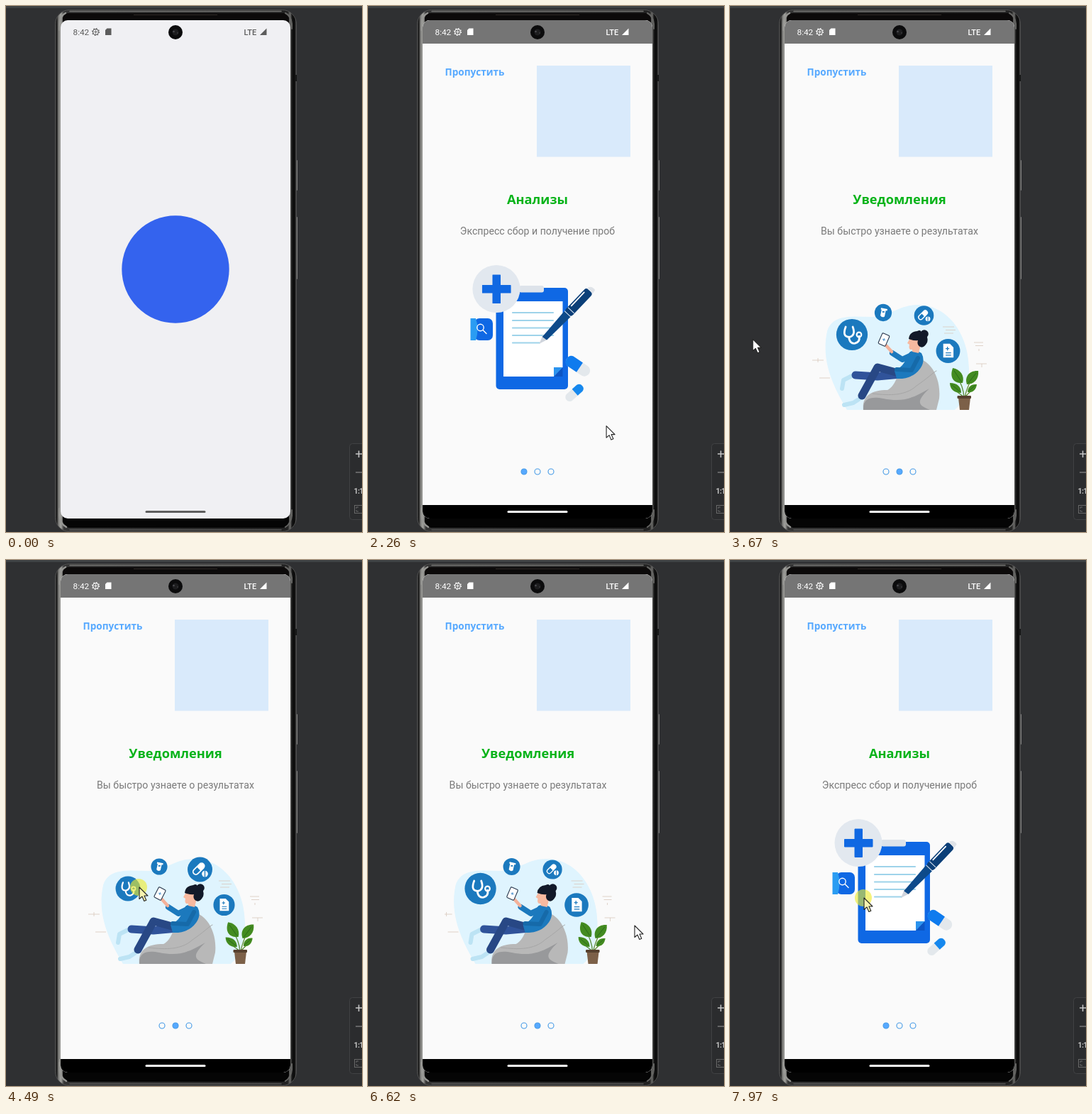
Animation, 502 px wide and 741 px high, one loop 8 s. Source, as an HTML page:

```html
<!DOCTYPE html>
<html lang="ru">
<head>
<meta charset="utf-8">
<title>Onboarding</title>
<style>
html, body { margin: 0; width: 100%; height: 100%; overflow: hidden; background: #2f3032; }
svg { display: block; width: 100%; height: 100%; }
text { font-family: Roboto, sans-serif; }
.title { font: 700 18.2px "Noto Sans", sans-serif; fill: #07b319; text-anchor: middle; }
.body { font-size: 14.15px; fill: #7a7a7a; text-anchor: middle; }
.skip { font: 600 13.6px "Noto Sans", sans-serif; fill: #57a9ff; }
.line { fill: none; stroke-linecap: round; stroke-linejoin: round; }
</style>
</head>
<body>
<svg viewBox="0 0 502 741" preserveAspectRatio="none">
<defs>
  <linearGradient id="edge">
    <stop offset="0" stop-color="#3c3c3c"/><stop offset=".006" stop-color="#1a1a1a"/>
    <stop offset=".014" stop-color="#82827f"/><stop offset=".024" stop-color="#a2a29e"/>
    <stop offset=".036" stop-color="#343434"/><stop offset=".964" stop-color="#222"/>
    <stop offset=".974" stop-color="#6c6c6a"/><stop offset=".982" stop-color="#161616"/>
    <stop offset=".992" stop-color="#080808"/><stop offset="1" stop-color="#4c4c4c"/>
  </linearGradient>
  <clipPath id="screenClip"><rect x="77" y="20" width="324" height="702" rx="10"/></clipPath>
  <clipPath id="pagerClip"><rect x="108" y="258" width="262" height="385"/></clipPath>
</defs>

<rect width="502" height="741" fill="#2f3032"/>
<rect width="502" height="3" fill="#3f4244"/>

<!-- phone body -->
<rect x="409" y="217" width="2" height="43" rx="1" fill="#858585"/>
<rect x="409" y="297" width="2" height="88" rx="1" fill="#858585"/>
<rect x="69.500" y="5.500" width="340" height="735" rx="20" fill="url(#edge)" stroke="#505050"/>
<path class="line" d="M90 7.500H388" stroke="#777775" stroke-width="1.600"/>
<path class="line" d="M90 738H388" stroke="#555" stroke-width="1.600"/>
<path d="M88 10H391Q398 10 399 17V30H80V17Q81 10 88 10Z" fill="#0c0a0a"/>
<path d="M80 710H399V726Q398 734 390 735H89Q81 734 80 726Z" fill="#050505"/>
<path class="line" d="M75.500 34V25Q76 14 84 10M75.500 708V718Q76 729 85 734" stroke="#969693" stroke-width="2.500"/>
<path class="line" d="M403 32V25Q402 14 394 10M403 710V718Q402 729 394 734" stroke="#646462" stroke-width="2"/>
<path d="M180 12.500H298" stroke="#302b28"/>
<path d="M409 97V106" stroke="#151515" stroke-width="2"/>

<g clip-path="url(#screenClip)">
  <rect x="77" y="20" width="324" height="702" fill="#f0f0f3"/>
  <circle id="splash" cx="239" cy="371" r="75.700" fill="#3463ee"/>

  <g id="app">
    <rect x="77" y="20" width="324" height="702" fill="#fafafa"/>
    <rect x="77" y="20" width="324" height="33" fill="#757575"/>
    <rect x="77" y="703" width="324" height="19"/>
    <text id="skip" class="skip" x="108.500" y="98"></text>
    <rect x="238" y="84" width="132" height="128.500" fill="#d9eafb"/>

    <g clip-path="url(#pagerClip)">
      <g id="page0">
        <text class="title" x="239" y="279">Анализы</text>
        <text class="body" x="239" y="322">Экспресс сбор и получение проб</text>
        <rect x="180.500" y="397" width="101.500" height="143" rx="5" fill="#0f68e4"/>
        <path d="M191 416H274.500V509L262 522H191Z" fill="#fff"/>
        <path d="M262 522V509H274.500Z" fill="#2b93ee"/>
        <path d="M262 522L274.500 509V522Z" fill="#0c55c4"/>
        <rect x="213" y="394" width="35" height="9.500" rx="3" fill="#dde3ea"/>
        <path class="line" d="M204 432H261M204 443H261M204 453.500H261M204 464H261M204 474.500H242" stroke="#9ed3ea" stroke-width="2.200"/>
        <g id="cross">
          <circle cx="181" cy="398.500" r="33.500" fill="#e2e8ef"/>
          <path d="M176 379h10.500v14.500h14.500v10.500h-14.500v14.500h-10.500v-14.500h-14.500v-10.500h14.500z" fill="#1068e2" stroke="#1068e2" stroke-linejoin="round"/>
        </g>
        <rect x="150" y="440" width="26" height="31" rx="7" fill="#0f68e4"/>
        <path d="M144.500 440H152Q157 455 152 471H144.500Z" fill="#2a9cf2"/>
        <g class="line" stroke="#fff" stroke-width="1.400"><circle cx="158.500" cy="453" r="4.700"/><path d="M162 456.500L167 461.500"/></g>
        <g id="pen">
          <g transform="translate(241 476) rotate(-46.500)">
            <path d="M0 0L13-5L14 5Z" fill="#cfd4dc"/>
            <path d="M10-3.700L58-6L58 6L11 4Z" fill="#0d4a8a"/>
            <rect x="58" y="-6.500" width="45" height="13" rx="4" fill="#0b3f78"/>
            <path d="M104-5Q111-3 109 5L103 6Z" fill="#dfe3e8"/>
            <path class="line" d="M70-4H96" stroke="#fff" stroke-width="1.800"/>
            <path d="M58-6V6M65-6V6" stroke="#dfe9f4" stroke-width="1"/>
          </g>
        </g>
        <g transform="translate(296 507.500) rotate(34)">
          <rect x="-19" y="-8" width="38" height="16" rx="8" fill="#e3e8ec"/>
          <path d="M3-8H-13Q-19-7-19 0T-13 8H3Z" fill="#0f7bee"/>
        </g>
        <g transform="translate(291 545) rotate(-42)">
          <rect x="-15" y="-6" width="30" height="12" rx="6" fill="#e3e8ec"/>
          <path d="M1-6H10Q15-5 15 0T10 6H1Z" fill="#1688ee"/>
        </g>
      </g>

      <g id="page1">
        <text class="title" x="239" y="279">Уведомления</text>
        <text class="body" x="239" y="322">Вы быстро узнаете о результатах</text>
        <path d="M165 569C145 535 128 500 137 458C145 433 174 438 202 438C230 435 238 421 266 421C310 422 337 466 337 512C337 540 327 561 317 569Z" fill="#dff4fe"/>
        <path d="M300 452H316M304 456.500H318M302 461H315M344 474H357M346 478.500H357M351 483V486M347 504H362M355 504V509M116 499H132M124 496V502M126 524H141" stroke="#d9c8bb" stroke-width=".8"/>
        <path d="M188 569C186 550 198 541 222 541C239 533 237 500 257 496C282 494 298 524 295 553L291 569Z" fill="#b8b8b8"/>
        <path d="M188 569C187 552 200 550 216 553C246 559 260 551 281 539C260 559 267 563 282 569Z" fill="#98999b"/>
        <path class="line" d="M201 546C226 549 248 549 263 535C278 525 288 515 291 514" stroke="#a6a6a6"/>
        <path class="line" d="M172 521L160 527L158 539M183 553L174 559L161 562" stroke="#bce3f4" stroke-width="6"/>
        <path class="line" d="M241 519L208 522L177 520" stroke="#30539a" stroke-width="11"/>
        <path class="line" d="M241 518L208 509L186 549" stroke="#284885" stroke-width="11"/>
        <path d="M254 487Q262 483 270 489Q276 500 268 511Q257 526 235 525L232 514Q247 507 249 493Z" fill="#1c79bd"/>
        <path class="line" d="M256 492L243 498L229 489" stroke="#1c79bd" stroke-width="8"/>
        <path class="line" d="M228 487L219 477" stroke="#f4b199" stroke-width="4.500"/>
        <path class="line" d="M265 496L256 513L235 512" stroke="#166aa9" stroke-width="6"/>
        <g id="tablet"><rect x="-5.500" y="-8" width="11" height="16" rx="1.500" fill="#fff" stroke="#27364c" stroke-width="1.100"/><path d="M-2 0H2M0-2V2" stroke="#4a91cc"/></g>
        <path d="M254 468Q262 461 269 468L268 481L266 489L257 487L257 484Q251 485 253 477L250 475Z" fill="#f7b9a0"/>
        <path d="M252 469Q253 459 264 458Q269 455 270 460Q281 463 278 474Q273 483 268 480Q263 477 265 471Q260 472 252 469Z" fill="#121929"/>
        <circle cx="274" cy="462" r="5.800" fill="#121929"/>
        <g id="plant">
          <path class="line" d="M330 552Q329 535 320 523M331 551Q334 538 341 524M330 551L317 541M331 551L342 540" stroke="#5a8b35" stroke-width="1.300"/>
          <g fill="#438b20">
            <path d="M328 531C315 532 309 523 314 510C325 512 331 521 328 531Z"/>
            <path d="M334 533C330 522 338 513 350 514C351 526 344 533 334 533Z"/>
            <path d="M326 545C315 545 310 539 310 531C320 531 326 536 326 545Z"/>
            <path d="M335 544C335 537 340 532 348 533C347 541 342 545 335 544Z"/>
          </g>
          <path class="line" d="M316 514L326 529M347 517L336 531M313 534L324 543M345 535L337 542" stroke="#24631b" stroke-width=".8"/>
        </g>
        <path d="M322 552H339L337 569H324Z" fill="#7c6048"/><rect x="320.500" y="549" width="19.500" height="4" rx="1" fill="#56412f"/>
        <g id="badge0"><circle r="20" fill="#1b79be"/><path class="line" d="M-8-10Q-13 3-3 3Q5 1 1-10M-4 3Q-3 12 4 11Q11 9 9 2" stroke="#fff" stroke-width="2.500"/><circle cx="9" r="3" fill="none" stroke="#fff" stroke-width="2"/></g>
        <g id="badge1"><circle r="20" fill="#1b79be"/><path d="M-7-10H8V-6H5V8Q0 13-5 8V-6H-7Z" fill="#fff" transform="rotate(12)"/><path d="M-2-2H3" stroke="#1b79be" stroke-width="3"/></g>
        <g id="badge2"><circle r="20" fill="#1b79be"/><g transform="translate(-2 -1) rotate(-45)"><rect x="-11" y="-4.500" width="22" height="9" rx="4.500" fill="none" stroke="#fff" stroke-width="2"/><path d="M0-4H7Q11-3 11 0T7 4H0Z" fill="#fff"/></g><circle cx="8" cy="7" r="5" fill="#fff"/><path d="M8 2V12" stroke="#1b79be" stroke-width="1.500"/></g>
        <g id="badge3"><circle r="20" fill="#1b79be"/><path d="M-8-12H3L9-6V11H-8Z" fill="#fff"/><path d="M-4-4H2M-1-7V-1M-4 3H5M-4 7H5" stroke="#1b79be" stroke-width="1.500"/></g>
      </g>

      <g id="page2">
        <text class="title" x="239" y="279">Мониторинг</text>
        <text class="body" x="239" y="322">Наши врачи всегда наблюдают за</text>
        <text class="body" x="239" y="338.500">вашими показателями здоровья</text>
        <path d="M176 389C202 389 214 402 214 418C214 431 207 436 202 440L206 454Q194 450 186 444C153 447 137 434 137 415C138 399 154 389 176 389Z" fill="#d5dde9"/>
        <g id="heart">
          <path d="M0 17C-12 8-20 2-19-6C-17-16-5-17 0-9C5-17 17-16 19-6C20 2 12 8 0 17Z" fill="#0f66e0"/>
          <path class="line" d="M11-10Q15-9 15-5" stroke="#76adf5" stroke-width="1.500"/>
        </g>
        <path d="M227 423C226 404 239 398 253 398C277 399 286 415 284 436C282 458 292 471 292 492Q278 493 260 478Z" fill="#033963"/>
        <path d="M227 424Q235 422 244 412Q247 425 257 434L258 479L239 483V465Q231 466 228 459Q224 443 227 424Z" fill="#eda783"/>
        <path d="M239 465Q248 465 255 459Q251 470 239 472Z" fill="#7a5c50"/>
        <path d="M242 413Q246 427 255 434Q250 440 258 443L260 471L278 480L279 418Q260 397 242 413Z" fill="#033963"/>
        <path d="M149 515L140 509Q130 500 129 489Q134 496 140 496L142 484Q148 489 147 498Q155 501 160 508Z" fill="#eda783"/>
        <path class="line" d="M130 490L128 485M136 496L132 484" stroke="#eda783" stroke-width="2.500"/>
        <path d="M232 490L256 476L270 486L264 590H223Z" fill="#e3e9f0"/>
        <path d="M206 590V549Q193 568 182 565Q164 558 146 516L164 506Q173 526 187 538Q203 502 216 489L239 477Q228 515 225 590Z" fill="#0f69e6"/>
        <path d="M257 475L276 479Q298 488 303 509Q316 548 316 586Q301 592 286 590H261Q262 531 257 475Z" fill="#0f69e6"/>
        <path class="line" d="M285 542Q283 565 287 590M206 549Q210 537 210 527" stroke="#c6dcfa"/>
        <path class="line" d="M231 487Q223 496 222 506M264 482Q278 504 270 526Q262 543 249 531Q240 519 247 507Q258 498 267 505Q276 514 270 531M249 532L236 541M249 532L263 549" stroke="#5796ed" stroke-width="4"/>
        <circle cx="222" cy="512" r="5.500" fill="#e6edf5" stroke="#b9cfea" stroke-width="2"/>
        <path class="line" d="M228 542L233 543M262 549L266 552" stroke="#6d8194" stroke-width="4.500"/>
        <circle cx="312" cy="426" r="22" fill="#e0e7f0"/>
        <path class="line" d="M303 426.500H321M312 417.500V435.500" stroke="#0f66e0" stroke-width="8.500" style="stroke-linecap: square"/>
        <g id="dna" class="line"><path id="rungs" stroke="#9cc7f2" stroke-width="1.500"/><path id="strandA" stroke="#3984ed" stroke-width="3.500"/><path id="strandB" stroke="#4a91f0" stroke-width="3.500"/></g>
      </g>
    </g>
    <g id="dots" stroke="#459ae6" stroke-width="1.100"></g>
  </g>

  <!-- status icons -->
  <g id="status">
    <text x="94.500" y="41" font-size="11.800">8:42</text>
    <text x="335.500" y="40.500" font-size="11" font-weight="500">LTE</text>
    <path d="M358 41H367.500V31.500Z"/>
    <path d="M142.500 31.500H148.500V41H140V34Z"/>
    <g id="gear" fill="none"><circle cx="126.500" cy="36.500" r="3.900" stroke-width="1.100"/><circle cx="126.500" cy="36.500" r="5" stroke-width="1.200" stroke-dasharray="1.500 2.427"/><path d="M124 36.500H129M126.500 34V39" stroke-width=".8"/></g>
  </g>
  <rect id="pill" x="196.500" y="711" width="85" height="3" rx="1.500"/>
</g>

<circle cx="239" cy="37" r="10" fill="#0b0b0c"/>
<circle cx="239" cy="37" r="4.500" fill="#1d1d1f"/>
<circle cx="236.500" cy="36" r="1.300" fill="#4b4b4f"/><circle cx="242" cy="38" r="1" fill="#38383b"/>

<!-- zoom controls -->
<rect x="484.500" y="616.500" width="30" height="107" rx="4" fill="#2b2c2e" stroke="#414244"/>
<path d="M493 631H502M497.500 626.500V636" stroke="#c4c4c4" stroke-width="1.600"/>
<path d="M493 657H502" stroke="#777" stroke-width="1.500"/>
<text x="490.500" y="687" font-size="10.500" font-weight="700" letter-spacing="-.6" fill="#c4c4c4">1:1</text>
<g fill="none" stroke="#686868"><rect x="491.500" y="703.500" width="14" height="11"/><path d="M494 708V706H497M494 710V712H497"/></g>

<circle id="press" r="12" fill="#eeea2d" opacity=".62"/>
<path id="cursor" d="M0 0V16.500L4 13L6.800 19.500L9.800 18.200L7 12H12Z" fill="#fff" stroke="#242424" stroke-width="1.100" stroke-linejoin="round"/>
</svg>

<script>
const LOOP = 8000, PAGE = 262;
const $ = id => document.getElementById(id);
const set = (id, name, value) => $(id).setAttribute(name, value);
const move = (id, x, y, rest = '') => set(id, 'transform', `translate(${x} ${y}) ${rest}`);
const clamp = v => Math.min(1, Math.max(0, v));
const smooth = v => v * v * (3 - 2 * v);
const gray = v => `rgb(${[v, v, v].map(Math.round)})`;
const wave = (t, period, start = 0) => Math.sin(2 * Math.PI * (t - start) / period);

// rows of [time, ...values]
const pageKeys = [[2500, 0], [2860, 1], [4590, 1], [5020, 2], [6250, 2], [6680, 1], [7110, 1], [7520, 0]];
const cursorKeys = [
  [1700, 428, 748], [2110, 352, 694], [2380, 325, 520], [2490, 325, 520],
  [2730, 55, 505], [2920, -8, 498], [3200, -8, 498], [3740, 34, 468],
  [4350, 188, 461], [4570, 188, 461], [4820, 20, 466], [5000, 22, 440],
  [5380, 89, 72], [5620, 89, 72], [6120, 150, 544], [6230, 150, 544],
  [6480, 376, 515], [6650, 376, 515], [7000, 220, 513], [7090, 220, 513],
  [7330, 432, 497], [7500, 432, 497], [7860, 189, 476]
];
const presses = [[2440, 2740], [4440, 4830], [6180, 6490], [7060, 7340], [7900, 8000]];

// centre, mean radius, sine and cosine amplitudes
const badges = [
  [172, 463, 18.4, 3.6, 1], [216, 432, 10.6, 1.7, -.9],
  [273.5, 436, 15.2, -1, -2.3], [307.5, 486, 14.4, 2.7, -.6]
];

function sample(keys, t) {
  const next = keys.findIndex(k => k[0] > t);
  if (next === 0) return keys[0].slice(1);
  if (next < 0) return keys[keys.length - 1].slice(1);
  const a = keys[next - 1], b = keys[next];
  const p = smooth((t - a[0]) / (b[0] - a[0]));
  return a.slice(1).map((v, i) => v + (b[i + 1] - v) * p);
}

function buildDna() {
  const strands = ['', ''];
  let rungs = '';
  for (let x = -32; x <= 32; x += 2) {
    const y = 10 * Math.cos(x / 10.2);
    strands.forEach((_, i) => strands[i] += `${x > -32 ? 'L' : 'M'}${x} ${i ? -y : y}`);
    if (x % 6 === 0) rungs += `M${x} ${-y}V${y}`;
  }
  set('strandA', 'd', strands[0]);
  set('strandB', 'd', strands[1]);
  set('rungs', 'd', rungs);
}

function buildDots() {
  $('dots').innerHTML = [220, 239, 258].map(x => `<circle cx="${x}" cy="656" r="4"/>`).join('');
}

function drawArt(t) {
  const write = wave(t, 2257, 1200);
  move('pen', 3 * write, -write);
  const grow = 1 + .015 * write;
  set('cross', 'transform', `translate(181 398.5) scale(${grow}) translate(-181 -398.5)`);

  const angle = 2 * Math.PI * t / 3000;
  badges.forEach(([x, y, r, s, c], i) => {
    const radius = r + s * Math.sin(angle) + c * Math.cos(angle);
    move('badge' + i, x, y, `scale(${radius / 20})`);
  });
  const sway = Math.cos(angle);
  move('tablet', 217, 470, `rotate(${24 - 3 * sway})`);
  set('plant', 'transform', `rotate(${1.2 * sway} 330 550)`);

  const beat = wave(t, 1400, 5570);
  move('heart', 175.5, 419, `scale(${1 + .03 * beat})`);
  move('dna', 335, 490, `rotate(${-51 + 1.5 * beat})`);
}

function draw(t) {
  const enter = smooth(clamp((t - 500) / 350));
  set('app', 'opacity', enter);
  set('splash', 'opacity', 1 - enter);

  const ink = gray(92 + 163 * enter);
  set('status', 'fill', ink);
  set('gear', 'stroke', ink);
  set('pill', 'fill', gray(94 + 56 * enter + 105 * clamp((t - 1200) / 90)));

  const [pos] = sample(pageKeys, t);
  const active = Math.round(pos);
  for (let i = 0; i < 3; i++) {
    move('page' + i, (i - pos) * PAGE, 0);
    $('dots').children[i].setAttribute('fill', i === active ? '#57a9ff' : '#fafafa');
  }
  $('skip').textContent = active === 2 ? 'Завершить' : 'Пропустить';
  drawArt(t);

  const [x, y] = sample(cursorKeys, t);
  const down = presses.some(([a, b]) => t >= a && t < b);
  move('cursor', x, y);
  move('press', x - 1, y);
  set('press', 'visibility', down ? 'visible' : 'hidden');
  set('cursor', 'fill', down ? '#f7f3b0' : '#fff');
}

buildDna();
buildDots();
const start = performance.now();
function tick(now) {
  draw(Math.max(0, now - start) % LOOP);
  requestAnimationFrame(tick);
}
draw(0);
requestAnimationFrame(tick);
</script>
</body>
</html>
```
